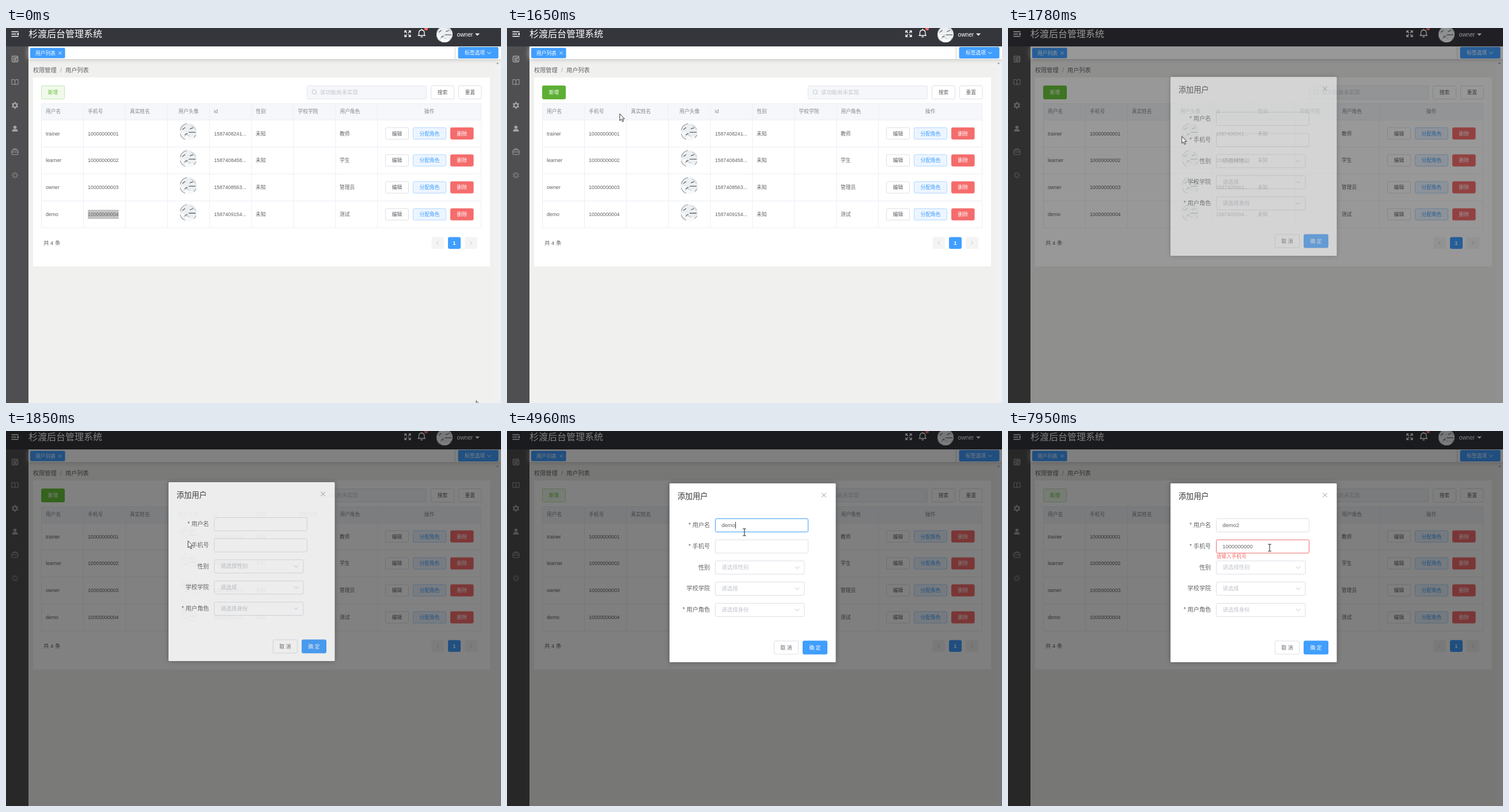
Recreate the animation shown at these times as an HTML page. Size 859 by 652 pixels, loop 8000 ms.

```html
<!DOCTYPE html>
<html lang="zh">
<head>
<meta charset="utf-8">
<title>用户列表</title>
<style>
  html, body { margin: 0; width: 100%; height: 100%; overflow: hidden; background: #f0f0ee; }
  svg { display: block; width: 859px; height: 652px; }
  text { font-family: "Liberation Sans", "Noto Sans CJK SC", "Noto Sans CJK", sans-serif; white-space: pre; }
  .line { fill: none; stroke-linecap: round; stroke-linejoin: round; }
</style>
</head>
<body>
<svg id="stage" viewBox="0 0 859 652"></svg>
<script>
const BLUE = '#409eff', RED = '#f56c6c', GREEN = '#67c23a', GREY = '#606266';
const BORDER = '#dcdfe6', RULE = '#ebeef5', HINT = '#c0c4cc';
const LOOP = 8000, REFRESH = 68.8;

// Static drawing helpers; text is placed by its vertical centre.
const label = (x, cy, str, size = 8.74, fill = GREY, extra = '') =>
  `<text x="${x}" y="${cy + size * 0.37}" font-size="${size}" fill="${fill}" ${extra}>${str}</text>`;
const box = (x, y, w, h, fill, stroke = 'none', r = 0, extra = '') =>
  `<rect x="${x}" y="${y}" width="${w}" height="${h}" rx="${r}" fill="${fill}" stroke="${stroke}" ${extra}/>`;
const line = (d, stroke, width = 1, extra = '') =>
  `<path class="line" d="${d}" stroke="${stroke}" stroke-width="${width}" ${extra}/>`;
const group = (x, y, content, extra = '') =>
  `<g transform="translate(${x} ${y})" ${extra}>${content}</g>`;
const centred = 'text-anchor="middle"';
const button = (x, y, w, h, str, fill = '#fff', stroke = BORDER, color = GREY, size = 8.74, extra = '') =>
  box(x, y, w, h, fill, stroke, 2) + label(x + w / 2, y + h / 2, str, size, color, centred + extra);
const chevron = (x, y, stroke, size = 3.5) =>
  line(`M${x - size} ${y - size / 2}l${size} ${size} ${size} ${-size}`, stroke);

const avatar = (x, y, r) => group(x, y, `<g transform="scale(${r / 14.5})">
  <circle r="14.5" fill="#eceff1"/>
  <path d="M-14 3Q-8 -2 -3 5T9 8L6 13Q-5 17 -12 9Z" fill="#f8f9fa"/>
  ${line('M-14 -3A14.3 14.3 0 0 1 -3 -14M-14 4Q-12 11 -6 13M10 10L13 6', '#999ea3', 1.2)}
  ${line('M1 1H12M-10 -4L-6 -7M-6 5L-2 3M3 -5L8 -7', '#5c6166', 1.3)}
  ${line('M-8 8Q-2 3 2 8M5 -11Q11 -9 12 -4', '#c4c9ce', 1.3)}</g>`);

function header() {
  const arrows = [0, 90, 180, 270].map(a =>
    line('M1.5 1.5L5 5M2 5H5V2', '#fff', 1.3, `transform="rotate(${a})"`)).join('');
  return box(0, 0, 859, 32, '#35363c') +
    line('M10 6.5H21M10 10.5H17M10 14.5H21', '#fff', 1.6) +
    '<path d="M22 8V13L18.5 10.5Z" fill="#fff"/>' +
    label(39, 10.5, '杉渡后台管理系统', 16, '#fff') +
    group(697, 10, arrows) +
    line('M715 13H727.500M716.500 13V8Q717 3.500 721.300 3.500T726 8V13M721.300 2V3M720 15.500H722.500', '#fff', 1.3) +
    '<circle cx="729" cy="1.300" r="3" fill="#f56c6c"/>' +
    avatar(761, 11, 14) + label(782.5, 11, 'owner', 10.2, '#fff') +
    '<path d="M814 9.500H822L818 13.500Z" fill="#fff"/>';
}

function sidebar() {
  const ink = '#a3a3a5';
  const spokes = [...Array(8)].map((_, i) => line('M0 -2.7V-5.2', ink, 1, `transform="rotate(${i * 45})"`)).join('');
  const teeth = [...Array(6)].map((_, i) => line('M0 -4V-5', ink, 2.4, `transform="rotate(${i * 60})"`)).join('');
  return box(0, 32, 39, 620, '#4f4f51') +
    group(15.5, 54, box(-5, -5, 10, 10, 'none', ink, 1.5, 'stroke-width="1.5"') +
      line('M3 -2H-2V2.500H3M0 1L4 -3', ink, 1.3)) +
    group(15.5, 94, line('M0 -3.500V4.500M0 -3.500Q-1 -4.500 -5.500 -4.500V4H-1L0 4.700 1 4H5.500V-4.500Q1 -4.500 0 -3.500', ink)) +
    group(15.5, 134.5, `<circle r="3.400" fill="none" stroke="${ink}" stroke-width="2.200"/>` + teeth) +
    group(15.5, 175, `<circle cy="-2.500" r="2.800" fill="${ink}"/><path d="M-5 5Q-5 .8 -1.500 .8H1.500Q5 .8 5 5Z" fill="${ink}"/>`) +
    group(15.5, 215, box(-5.5, -3, 11, 8, 'none', ink, 1) + line('M-2.500 -3V-5H2.500V-3M-5.500 .5H5.500', ink)) +
    group(15.5, 256, `<g id="spinner">${spokes}</g>`);
}

function tabs() {
  return box(39, 33, 820, 21, '#b5b5b5', 'none', 0, 'filter="url(#soft)"') +
    box(39, 32, 820, 22, '#fff') +
    box(42, 34.5, 60.5, 18, BLUE, 'none', 2) + label(51, 43.5, '用户列表', 8.74, '#fff') +
    line('M91.500 41L96.500 46M96.500 41L91.500 46', '#fff', 0.9) +
    box(776, 32, 5, 22, 'url(#edge)') +
    box(784.5, 33, 70, 20, BLUE, 'none', 2) + label(796, 43, '标签选项', 8.74, '#fff') +
    chevron(838.5, 43.5, '#fff', 3);
}

function table() {
  const step = 72.9, rowStep = 46.9, left = 61.5, right = 824.5;
  const edges = [...Array(9)].map((_, i) => left + i * step).concat(right);
  const heads = ['用户名', '手机号', '真实姓名', '用户头像', 'id', '性别', '学校学院', '用户角色', '操作'];
  const users = [
    ['trainer', '1587408241...', '教师'], ['learner', '1587408458...', '学生'],
    ['owner', '1587408563...', '管理员'], ['demo', '1587409154...', '测试']];
  let out = box(left, 131, right - left, 29, '#f5f7fa');
  heads.forEach((str, i) => {
    const middle = i === 3 || i === 8;
    const x = middle ? (edges[i] + edges[i + 1]) / 2 : edges[i] + 7.6;
    out += label(x, 145, str, 8.74, '#84888f', middle ? centred : '');
  });
  const rows = [131.5, ...[...Array(5)].map((_, i) => 160 + i * rowStep)];
  out += line(rows.map(y => `M${left} ${y}H${right}`).join('') +
    edges.map(x => `M${x} 131.5V347.6`).join(''), RULE);
  out += box(142, 316, 53.5, 16, '#c4c4c4', 'none', 0, 'id="selection"');
  users.forEach(([name, id, role], i) => {
    const cy = 183.3 + i * rowStep, top = cy - 10;
    out += label(69, cy, name) + label(142, cy, '1000000000' + (i + 1)) + avatar(316.5, cy - 3, 14.5) +
      label(361, cy, id) + label(433.3, cy, '未知') + label(579, cy, role) +
      button(658.5, top, 40, 20, '编辑') +
      button(706.5, top, 57, 20, '分配角色', '#ecf5ff', '#b3d8ff', BLUE) +
      button(771.5, top, 39.5, 20, '删除', RED, RED, '#fff');
  });
  return out;
}

function page() {
  return box(0, 0, 859, 652, '#f0f0ee') + box(847, 54, 12, 598, '#f1f1f1') +
    sidebar() + tabs() + header() +
    '<path d="M850.500 62.500H855.500L853 59.500Z" fill="#a3a3a3"/>' +
    label(47, 73.5, '权限管理', 10.2) + label(94, 73.5, '/', 10.2, '#a0a4ab') + label(103, 73.5, '用户列表', 10.2) +
    box(47, 86, 793, 328.5, '#fff') +
    `<g id="add">${button(61.5, 100.5, 40, 23, '新增')}</g>` +
    box(522.5, 100.5, 207, 23, '#f5f7fa', '#e4e7ed', 2) +
    `<circle cx="534.800" cy="111" r="3.600" fill="none" stroke="${HINT}"/>` + line('M537.500 114L539 115.500', HINT) +
    label(544.7, 111.8, '该功能尚未实现', 9.46, HINT) +
    button(737.5, 100.5, 40, 23, '搜索') + button(785.5, 100.5, 39.5, 23, '重置') +
    table() +
    label(65, 373.5, '共 4 条', 9.46) +
    box(738.5, 363.5, 21.5, 20.5, '#f4f4f5', 'none', 1.5) + box(796, 363.5, 22, 20.5, '#f4f4f5', 'none', 1.5) +
    line('M750.500 370.700L747.500 373.700 750.500 376.700M805.500 370.700L808.500 373.700 805.500 376.700', HINT) +
    button(767.5, 364, 21, 19.5, '1', BLUE, BLUE, '#fff', 9.46, ' font-weight="bold"');
}

const fields = [
  { name: '* 用户名', cy: 164 }, { name: '* 手机号', cy: 200.7 },
  { name: '性别', cy: 237.4, hint: '请选择性别' }, { name: '学校学院', cy: 274.2, hint: '请选择' },
  { name: '* 用户角色', cy: 311, hint: '请选择身份' }];

function dialog() {
  let out = box(282, 91, 288.5, 311, '#000', 'none', 2, 'opacity=".3" filter="url(#soft)"') +
    box(282, 91, 288.5, 311, '#fff', 'none', 1.5) +
    label(296, 113.5, '添加用户', 13.1, '#303133') +
    line('M546.500 108L553.500 115M553.500 108L546.500 115', '#909399');
  fields.forEach(({ name, cy, hint }, i) => {
    out += label(352.3, cy - 0.5, name, 10.2, GREY, 'text-anchor="end"') +
      box(361.5, cy - 11.5, hint ? 154.5 : 161, 23, '#fff', BORDER, 2, `id="field${i}"`) +
      label(372.3, cy - 0.5, hint || '', 9.46, hint ? HINT : GREY, `id="value${i}"`);
    if (hint) out += chevron(503.5, cy, HINT);
  });
  return out + label(361.5, 218, '请输入手机号', 8.74, RED, 'id="error"') +
    box(0, -6, 1, 11.5, '#333', 'none', 0, 'id="caret"') +
    button(463.5, 365, 42, 23, '取 消') + button(513.5, 365, 42, 23, '确 定', BLUE, BLUE, '#fff');
}

document.getElementById('stage').innerHTML = `
  <defs>
    <filter id="soft" x="-20%" y="-100%" width="140%" height="300%"><feGaussianBlur stdDeviation="4"/></filter>
    <linearGradient id="edge"><stop stop-color="#fff"/><stop offset="1" stop-color="#e6e6e6"/></linearGradient>
  </defs>
  ${page()}
  ${box(0, 0, 859, 652, '#000', 'none', 0, 'id="mask"')}
  <g id="dialog">${dialog()}</g>
  <g id="pointer">
    <path id="arrow" d="M0 0V12L2.700 9.500 4.600 13.800 6.500 13 4.700 8.800H8.300Z" fill="#fff" stroke="#222" stroke-width=".9"/>
    ${line('M-2.500 -6H-.7L0 -5.500 .7 -6H2.500M-2.500 6H-.7L0 5.500 .7 6H2.500M0 -5.500V5.500', '#333', 1.1, 'id="beam"')}
  </g>`;

const el = id => document.getElementById(id);
const set = (id, attrs) => Object.entries(attrs).forEach(([k, v]) => el(id).setAttribute(k, v));
const show = (id, on) => set(id, { visibility: on ? 'visible' : 'hidden' });
const between = (t, a, b) => t >= a && t < b;

// CSS "ease": cubic-bezier(.25, .1, .25, 1), solved by bisection.
function ease(x) {
  if (x <= 0 || x >= 1) return x <= 0 ? 0 : 1;
  const curve = (u, a, b) => 3 * (1 - u) ** 2 * u * a + 3 * (1 - u) * u * u * b + u ** 3;
  let low = 0, high = 1;
  for (let i = 0; i < 20; i++) {
    const mid = (low + high) / 2;
    if (curve(mid, 0.25, 0.25) < x) low = mid; else high = mid;
  }
  return curve(low, 0.1, 1);
}

// Pointer stops: time, x, y.
const path = [
  [0, 816, 648], [200, 816, 648], [820, 803, 387], [1300, 95, 111], [1500, 90, 113], [1651, 195.5, 149],
  [1720, 287.5, 186], [1858, 316, 191], [2300, 395, 176], [2700, 419.5, 170], [4500, 419.5, 170],
  [4900, 412, 176], [5150, 412, 176], [5500, 428, 174], [5850, 428, 178], [5920, 428, 203],
  [6000, 428, 203], [6200, 430, 311], [6450, 451, 203], [6750, 454, 203], [LOOP, 454, 203]];

function pointerAt(t) {
  const i = path.findIndex(p => p[0] > t), [a, b] = [path[i - 1], path[i]];
  const k = (t - a[0]) / (b[0] - a[0]);
  return [a[1] + (b[1] - a[1]) * k, a[2] + (b[2] - a[2]) * k];
}

const CLICK_ADD = 1450, OPEN = 1687, FOCUS_NAME = 2740, FOCUS_PHONE = 5960, INVALID = 6250, REFOCUS = 6470;
const nameKeys = [4400, 4540, 4690, 4850, 5300];
const phoneKeys = [...Array(11)].map((_, i) => 6650 + i * 62);
const ERASE = 7495, BLINK = 410;

function draw(t) {
  const [x, y] = pointerAt(t);
  set('spinner', { transform: `rotate(${t * 0.18})` });
  show('selection', t < CLICK_ADD);

  const solid = between(t, 1270, FOCUS_NAME);
  const green = between(t, CLICK_ADD, 1780) ? '#5daf34' : GREEN;
  const [face, caption] = el('add').children;
  face.setAttribute('fill', solid ? green : '#f0f9eb');
  face.setAttribute('stroke', solid ? green : '#c2e7b0');
  caption.setAttribute('fill', solid ? '#fff' : GREEN);

  const shown = ease((t - OPEN) / 300);
  set('mask', { opacity: 0.5 * ease((t - OPEN) / 200) });
  set('dialog', { opacity: shown, transform: `translate(0 ${-14.6 * (1 - shown)})` });

  const typed = keys => keys.filter(k => k <= t).length;
  el('value0').textContent = 'demo2'.slice(0, typed(nameKeys));
  el('value1').textContent = '10000000000'.slice(0, typed(phoneKeys) - (t >= ERASE));
  const active = between(t, FOCUS_NAME, FOCUS_PHONE) ? 0 : t >= FOCUS_PHONE ? 1 : -1;
  fields.forEach(({ cy, hint }, i) => {
    const hovered = hint && t > FOCUS_PHONE && Math.abs(y - cy) < 11.5;
    const stroke = i === 1 && t >= INVALID ? RED : i === active ? BLUE : hovered ? HINT : BORDER;
    set('field' + i, { stroke });
  });
  show('error', t >= INVALID);

  const lastInput = Math.max(...[FOCUS_NAME, FOCUS_PHONE, REFOCUS, ERASE, ...nameKeys, ...phoneKeys].filter(k => k <= t));
  const blinkOn = Math.floor((t - lastInput) / BLINK) % 2 === 0;
  show('caret', active >= 0 && blinkOn && !between(t, INVALID, REFOCUS));
  if (active >= 0) {
    const width = el('value' + active).getComputedTextLength();
    set('caret', { x: 372.5 + width, y: fields[active].cy - 6 });
  }

  const overInput = t > 1900 && x > 361 && y < 213;
  set('pointer', { transform: `translate(${x} ${y})` });
  show('arrow', !overInput);
  show('beam', overInput);
}

const start = performance.now();
function tick(now) {
  const t = Math.max(0, now - start) % LOOP;
  draw(Math.floor((t + 18) / REFRESH) * REFRESH);
  requestAnimationFrame(tick);
}
requestAnimationFrame(tick);
</script>
</body>
</html>
```
